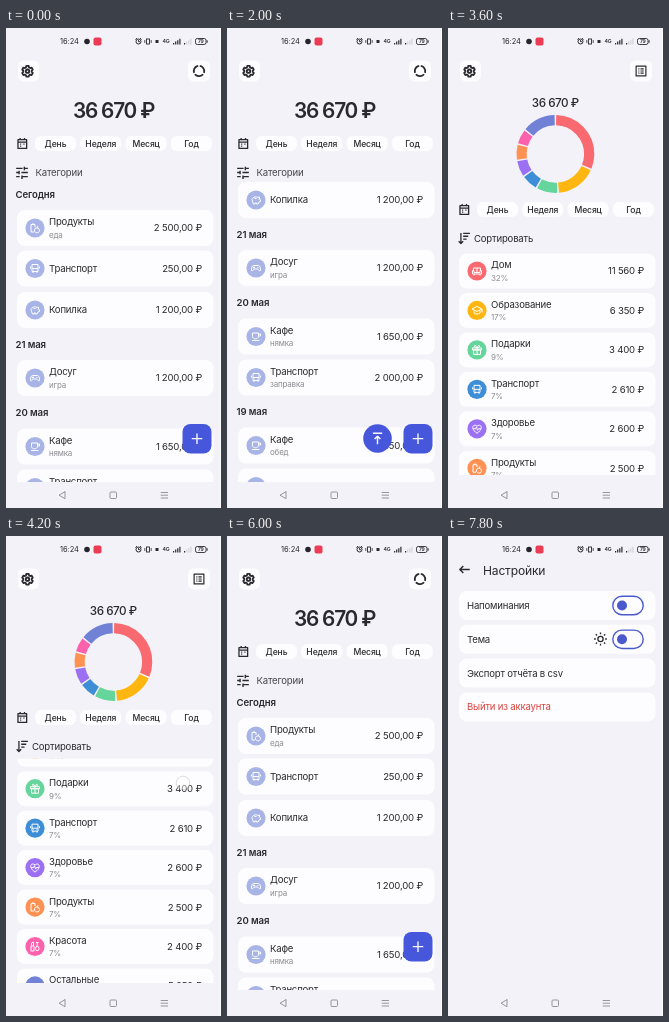
Recreate the animation shown at these times as an HTML page with a canvas. Size 215 px wide and 480 px high, loop 8000 ms.

```html
<!DOCTYPE html>
<html lang="ru">
<head>
<meta charset="utf-8">
<style>
html, body { margin: 0; width: 100%; height: 100%; overflow: hidden; background: #f3f2f8; }
canvas { display: block; width: 215px; height: 480px; }
</style>
</head>
<body>
<canvas id="stage"></canvas>
<script>
const W = 215, H = 480, LOOP = 8000, STEP = 200;
const BG = '#f3f2f8', CARD = '#fdfdff', INK = '#29292f', GREY = '#8b8b92';
const BLUE = '#4657db', PALE = '#a9b4e6';
const canvas = document.getElementById('stage');
const ctx = canvas.getContext('2d');
const dpr = window.devicePixelRatio || 1;
canvas.width = W * dpr;
canvas.height = H * dpr;

// Outline icons on a 24-unit grid
const ICONS = {
  gear: 'M9.8 3h4.4l.6 2.7 1.8 1 2.6-.8 2.2 3.8-2 1.9v2l2 1.9-2.2 3.8-2.6-.8-1.8 1-.6 2.5H9.8l-.6-2.5-1.8-1-2.6.8-2.2-3.8 2-1.9v-2l-2-1.9 2.2-3.8 2.6.8 1.8-1zM15 12.3a3 3 0 1 1-6 0a3 3 0 1 1 6 0',
  calendar: 'M4 5h16v16H4zM4 9.5h16M8 2v4M16 2v4M8 13h2M14 13h2M8 17h2',
  tune: 'M2 19h6M2 5h11M12 23v-6M12 19h10M7 9v6M2 12h5M22 12H11M16 8V2M16 5h6',
  sort: 'M6 2v19M2 17l4 4 4-4M10 3h12M10 8h9M10 13h6',
  list: 'M3 3h18v18H3zM7 8h2M11 8h6M7 12h2M11 12h6M7 16h2M11 16h6',
  back: 'M21 12H4M10 6l-6 6 6 6',
  plus: 'M12 3v18M3 12h18',
  top: 'M4 3h16M12 22V8M7 13l5-5 5 5',
  sun: 'M16.5 12a4.5 4.5 0 1 1-9 0a4.5 4.5 0 1 1 9 0M12 1v3M12 20v3M1 12h3M20 12h3M4 4l2 2M18 18l2 2M20 4l-2 2M6 18l-2 2',
  food: 'M4 20V5h4V2M8 5h4v5M4 20h6M12 13c3-2 9-1 9 4 0 6-9 6-10 1 0-2 0-4 1-5M16 12l2-4',
  bus: 'M6 4h12v14H6zM6 12h12M8 18v3M16 18v3M8 15h1M15 15h1M3 8v4M21 8v4',
  pig: 'M4 11c2-6 9-6 12-4l3-1v4l2 2v3l-3 1-2 4h-3v-2h-3v2H7l-2-5zM9 9h4M16 11h.5',
  game: 'M7 7h10c4 0 5 11 3 11-2 0-3-4-5-4H9c-2 0-3 4-5 4-2 0-1-11 3-11zM8 9v4M6 11h4M15 11h2',
  cup: 'M5 5h12v7c0 6-12 6-12 0zM17 7h4v4h-4M4 20h15',
  sofa: 'M5 11V6h14v5M3 11h3v4h12v-4h3v7H3zM6 18v3M18 18v3M12 6v9',
  study: 'M2 9l10-5 10 5-10 5zM6 12v5c3 3 9 3 12 0v-5M22 9v7',
  gift: 'M3 8h18v4H3zM5 12h14v9H5zM12 8v13M12 8C6 8 6 2 9 3l3 5 3-5c3-1 3 5-3 5',
  heart: 'M12 21C-3 11 5 0 12 7c7-7 15 4 0 14zM4 12h5l2-4 2 7 2-3h5',
  beauty: 'M4 11h6v10H4zM5 11V5l4-2v8M20 16a3.5 4.5 0 1 1-7 0a3.5 4.5 0 1 1 7 0M16.5 11V4M14 4h5',
  more: 'M5 12h1M12 12h1M19 12h1'
};
for (const k in ICONS) ICONS[k] = new Path2D(ICONS[k]);

const DAYS = [
  ['Сегодня', 167],
  ['Продукты', 200, '2 500,00 ₽', 'еда', 'food'],
  ['Транспорт', 240.5, '250,00 ₽', '', 'bus'],
  ['Копилка', 282, '1 200,00 ₽', '', 'pig'],
  ['21 мая', 317],
  ['Досуг', 350, '1 200,00 ₽', 'игра', 'game'],
  ['20 мая', 385],
  ['Кафе', 418.5, '1 650,00 ₽', 'нямка', 'cup'],
  ['Транспорт', 459.5, '2 000,00 ₽', 'заправка', 'bus'],
  ['19 мая', 494],
  ['Кафе', 527.5, '850,00 ₽', 'обед', 'cup'],
  ['Копилка', 568.5, '1 200,00 ₽', '', 'pig']
];
const GROUPS = [
  ['Дом', 11560, '#f96a70', 'sofa'],
  ['Образование', 6350, '#ffb611', 'study'],
  ['Подарки', 3400, '#66d59b', 'gift'],
  ['Транспорт', 2610, '#3d8ed6', 'bus'],
  ['Здоровье', 2600, '#9c70f3', 'heart'],
  ['Продукты', 2500, '#ff9252', 'food'],
  ['Красота', 2400, '#fc62ab', 'beauty'],
  ['Остальные', 5250, '#7081d6', 'more']
];
const TOTAL = 36670;

// Piecewise-linear value at time t from [time, value] points
function track(t, points) {
  let [t0, v0] = points[0];
  if (t <= t0) return v0;
  for (const [t1, v1] of points) {
    if (t < t1) return v0 + (v1 - v0) * (t - t0) / (t1 - t0);
    t0 = t1;
    v0 = v1;
  }
  return v0;
}

const spaced = n => String(n).replace(/(\d)(?=(\d{3})+$)/g, '$1 ');

function text(s, x, y, { size = 9.6, weight = 400, color = INK, align = 'left', gap = -0.2 } = {}) {
  ctx.font = `${weight} ${size}px Inter, sans-serif`;
  ctx.letterSpacing = gap + 'px';
  ctx.textAlign = align;
  ctx.fillStyle = color;
  ctx.fillText(s, x, y + size * 0.36);
}

function box(x, y, w, h, r, color) {
  ctx.fillStyle = color;
  ctx.beginPath();
  ctx.roundRect(x, y, w, h, r);
  ctx.fill();
}

function disc(x, y, r, color) {
  ctx.fillStyle = color;
  ctx.beginPath();
  ctx.arc(x, y, r, 0, 7);
  ctx.fill();
}

function icon(name, x, y, size, color = INK, width = 1.2) {
  const k = size / 24;
  ctx.save();
  ctx.translate(x - size / 2, y - size / 2);
  ctx.scale(k, k);
  ctx.strokeStyle = color;
  ctx.lineWidth = width / k;
  ctx.lineJoin = 'round';
  ctx.stroke(ICONS[name]);
  ctx.restore();
}

function line(color, width, ...pts) {
  ctx.strokeStyle = color;
  ctx.lineWidth = width;
  ctx.beginPath();
  pts.forEach(([x, y]) => ctx.lineTo(x, y));
  ctx.stroke();
}

function clipped(top, bottom, draw) {
  ctx.save();
  ctx.beginPath();
  ctx.rect(0, top, W, bottom - top);
  ctx.clip();
  draw();
  ctx.restore();
}

function statusBar() {
  text('16:24', 54, 13.5, { size: 7.5, gap: -0.05 });
  disc(81, 13.5, 2.8, '#25252b');
  box(87.5, 9.5, 8, 8, 2, '#ec3b55');
  ctx.strokeStyle = INK;
  ctx.lineWidth = 1;
  ctx.beginPath();
  ctx.arc(132.5, 13.5, 2.5, 0, 7);
  ctx.stroke();
  line(INK, 0.9, [132.5, 12], [132.5, 13.7], [134, 13.7]);
  line(INK, 0.9, [129.4, 11.6], [131, 10]);
  line(INK, 0.9, [134, 10], [135.6, 11.6]);
  ctx.strokeRect(140.5, 11, 3, 5);
  line(INK, 0.8, [138.8, 12], [138.8, 15]);
  line(INK, 0.8, [145.2, 12], [145.2, 15]);
  box(149.5, 12, 3, 3, 0, INK);
  text('4G', 156.5, 13.5, { size: 5.2, weight: 600 });
  for (let i = 0; i < 4; i++) {
    const h = 1.5 + i * 1.4;
    box(167 + i * 2.1, 16.5 - h, 1.2, h, 0, INK);
    box(178 + i * 2.1, 16.5 - h, 1.2, h, 0, i ? '#d2d2d9' : INK);
  }
  ctx.strokeStyle = INK;
  ctx.lineWidth = 0.9;
  ctx.beginPath();
  ctx.roundRect(189.5, 10.5, 10.5, 6, 1.8);
  ctx.stroke();
  box(200.6, 12.3, 1, 2.4, 0, INK);
  text('79', 194.8, 13.5, { size: 5, weight: 600, align: 'center' });
}

function navBar() {
  const c = '#8c8c93';
  line(c, 0.9, [59, 463.7], [53, 467.2], [59, 470.7], [59, 463.2]);
  ctx.strokeStyle = c;
  ctx.beginPath();
  ctx.roundRect(104, 464, 6.5, 6.5, 1);
  ctx.stroke();
  for (const y of [464.5, 467.2, 470]) line(c, 0.9, [154.7, y], [162, y]);
}

function topButtons(kind) {
  box(12, 32.5, 21, 21, 6, CARD);
  box(182, 32.5, 22, 21, 6, CARD);
  icon('gear', 21.5, 43, 13.5, INK, 1.8);
  if (kind === 'list') return icon('list', 193, 43, 13, INK, 1.2);
  ctx.strokeStyle = INK;
  ctx.lineWidth = 1.8;
  for (let i = 0; i < 3; i++) {
    const a = -Math.PI / 2 + i * Math.PI * 2 / 3;
    ctx.beginPath();
    ctx.arc(193, 43, 5.2, a + 0.15, a + Math.PI * 2 / 3 - 0.15);
    ctx.stroke();
  }
}

function periods(y) {
  icon('calendar', 16.3, y, 13, INK, 1.3);
  ['День', 'Неделя', 'Месяц', 'Год'].forEach((s, i) => {
    const x = 49.5 + i * 45.3;
    box(x - 20.5, y - 7.5, 41, 15, 6, CARD);
    text(s, x, y, { size: 8.6, weight: 500, align: 'center', gap: -0.12 });
  });
}

function row(title, y, amount, sub, glyph, color, half) {
  box(11, y - half, 196.5, half * 2, 8, CARD);
  disc(29, y, 9.6, color);
  icon(glyph, 29, y, 12, '#fff', 1);
  text(title, 43, sub ? y - 6 : y);
  if (sub) text(sub, 43, y + 7, { size: 8, color: GREY });
  text(amount, 196, y, { align: 'right' });
}

function operations(scroll, upAlpha) {
  topButtons('ring');
  text('36 670 ₽', 107.5, 82.5, { size: 20.8, weight: 600, align: 'center', gap: -1.2 });
  periods(115.5);
  clipped(152, 454, () => {
    for (const [name, y, amount, sub, glyph] of DAYS) {
      if (amount) row(name, y - scroll, amount, sub, glyph, PALE, 18);
      else text(name, 9.5, y - scroll, { weight: 600, gap: -0.1 });
    }
  });
  icon('tune', 16, 144.5, 14, INK, 1.4);
  text('Категории', 29.5, 144.5, { color: '#45454b' });
  if (upAlpha > 0) {
    ctx.globalAlpha = upAlpha;
    disc(150.5, 410.5, 14.3, BLUE);
    icon('top', 150.5, 410.5, 14, '#fff', 1.4);
    ctx.globalAlpha = 1;
  }
  box(176.5, 396, 29, 29.5, 8, BLUE);
  icon('plus', 191, 410.7, 14, '#fff', 1.3);
}

function ring() {
  let a = -Math.PI / 2;
  for (const [, value, color] of GROUPS) {
    const b = a + value / TOTAL * Math.PI * 2;
    ctx.strokeStyle = color;
    ctx.lineWidth = 10.2;
    ctx.beginPath();
    ctx.arc(107.4, 126, 33.8, a + 0.022, b - 0.022);
    ctx.stroke();
    a = b;
  }
}

function chart(scroll) {
  topButtons('list');
  text('36 670 ₽', 107.2, 74.5, { size: 11.7, weight: 500, align: 'center', gap: -0.5 });
  ring();
  periods(181.5);
  clipped(222.8, 447, () => GROUPS.forEach(([name, value, color, glyph], i) => {
    const share = Math.round(value / TOTAL * 100) + '%';
    row(name, 243 + i * 39.45 - scroll, spaced(value) + ' ₽', share, glyph, color, 17.5);
  }));
  icon('sort', 16.3, 210.5, 13.5, INK, 1.3);
  text('Сортировать', 26, 210.5);
}

function toggle(y) {
  ctx.strokeStyle = '#4a59cb';
  ctx.lineWidth = 1.4;
  ctx.beginPath();
  ctx.roundRect(164.8, y - 9.2, 30.4, 18.4, 9.2);
  ctx.stroke();
  disc(174, y, 5, '#4a59cb');
}

function settings() {
  icon('back', 16.5, 33.5, 14, INK, 1.4);
  text('Настройки', 35, 34.2, { size: 12.1 });
  ['Напоминания', 'Тема', 'Экспорт отчёта в csv', 'Выйти из аккаунта'].forEach((s, i) => {
    const y = 69.5 + i * 33.8;
    box(11, y - 14.5, 196.5, 29, 8, CARD);
    text(s, 19, y, { color: i === 3 ? '#d8433f' : INK });
    if (i < 2) toggle(y);
  });
  icon('sun', 152.5, 103, 14, INK, 1.3);
}

// Faint finger marker: [from, to, x, startY, endY]
const TOUCHES = [
  [1400, 1800, 160, 286, 205],
  [2400, 2600, 150.5, 410, 410],
  [3200, 3400, 193, 43, 43],
  [4000, 4400, 177, 278, 216],
  [5600, 5800, 193, 43, 43],
  [7000, 7200, 21.5, 43, 43]
];

function touch(t) {
  for (const [from, to, x, y0, y1] of TOUCHES) {
    if (t < from || t >= to) continue;
    const y = y0 + (y1 - y0) * (t - from) / (to - from);
    disc(x, y, 6.8, 'rgba(255,255,255,.4)');
    ctx.strokeStyle = 'rgba(150,150,160,.4)';
    ctx.lineWidth = 0.8;
    ctx.stroke();
  }
}

function render(t) {
  ctx.setTransform(dpr, 0, 0, dpr, 0, 0);
  ctx.fillStyle = BG;
  ctx.fillRect(0, 0, W, H);
  if (t >= 7400) settings();
  else if (t >= 3400 && t < 5800) {
    chart(track(t, [[3800, 0], [4000, 34], [4200, 69.2], [4400, 96], [4600, 80], [5000, 0]]));
  } else {
    const scroll = track(t, [[1200, 0], [1400, 14.5], [1800, 95], [2200, 125], [2400, 125], [2800, 0]]);
    operations(scroll, track(t, [[1400, 0], [1800, 1], [2600, 1], [2800, 0.62], [3000, 0]]));
  }
  statusBar();
  navBar();
  touch(t);
  box(W - 1, 0, 1, H, 0, '#fff');
}

function frame() {
  const t = performance.now() % LOOP;
  render(Math.floor(t / STEP) * STEP);
  requestAnimationFrame(frame);
}
frame();
</script>
</body>
</html>
```
